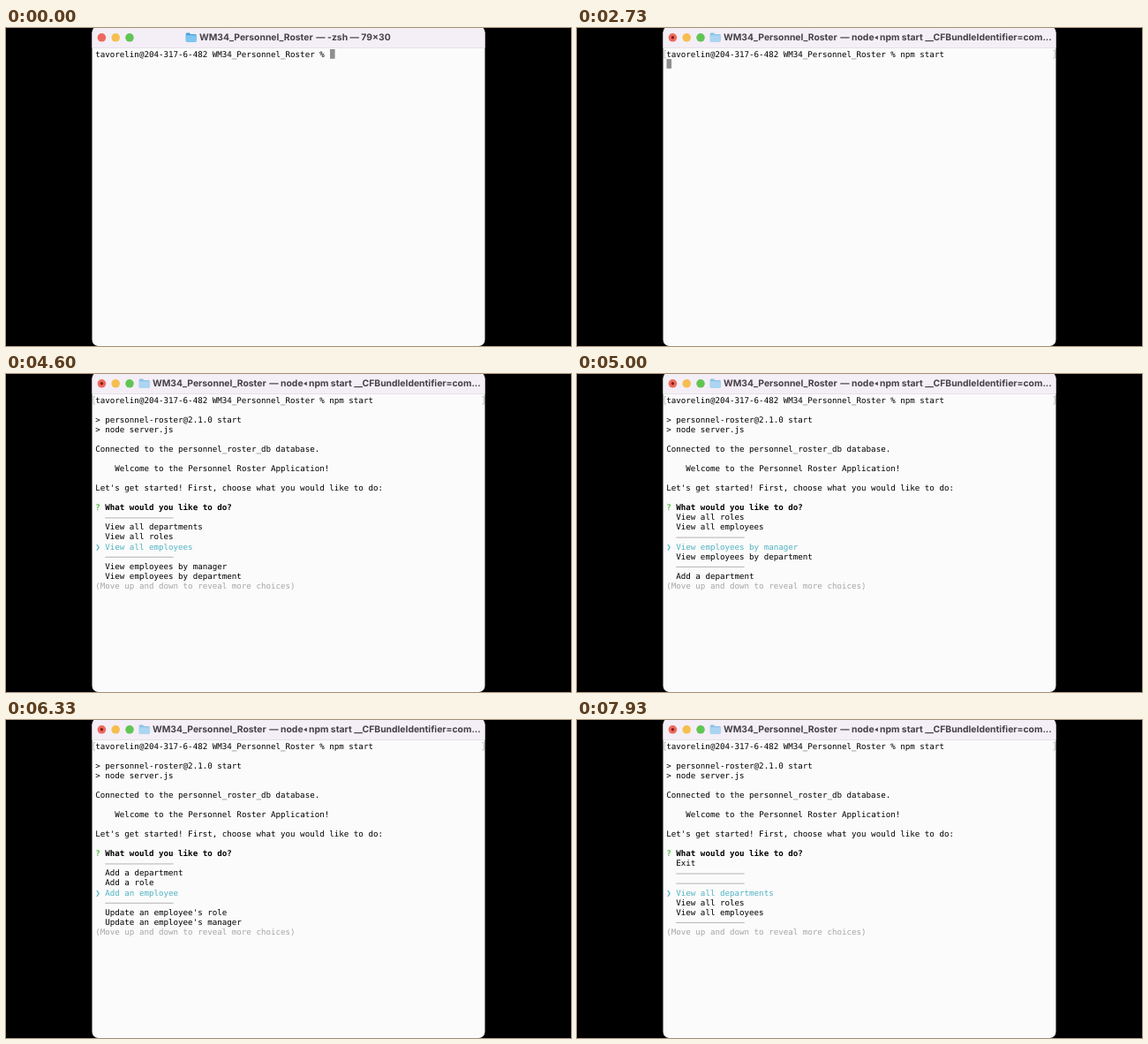
These frames come from a looping animation (640x360 px, 8000 ms). An HTML page:

```html
<!DOCTYPE html>
<html lang="en">
<head>
<meta charset="utf-8">
<title>Terminal session</title>
<style>
  html, body { margin: 0; width: 100%; height: 100%; overflow: hidden; background: #000; }
  svg { display: block; width: 640px; height: 360px; }
  text { white-space: pre; text-rendering: geometricPrecision; }
  .mono { font: 9.19px "DejaVu Sans Mono", "Noto Sans Mono", monospace; }
  .bold { font-weight: 700; }
  .title { font: 700 10.35px Inter, "Open Sans", sans-serif; fill: #454147; }
</style>
</head>
<body>
<svg id="stage" viewBox="0 0 640 360" xmlns="http://www.w3.org/2000/svg"></svg>
<script>
const LOOP = 8000;
const X0 = 101.2, COL = 5.532, BASE = 32.5, ROW = 11.07;
const INK = '#000', DIM = '#a6a6a6', CYAN = '#52b3c3', GREEN = '#5cb84c';

const PROJECT = 'WM34_Personnel_Roster';
const PROMPT = `tavorelin@204-317-6-482 ${PROJECT} % `;
const COMMAND = 'npm start';
const KEY_TIMES = [730, 930, 1060, 1260, 1460, 1660, 1800, 1930, 2060];
const ENTER = 2460, LAUNCH = 2800, MENU = 3200;
const FIRST_DOWN = 4200, DOWN_GAP = 333, LAST_DOWN = 11;

// An empty entry is a separator.
const CHOICES = [
  '', 'View all departments', 'View all roles', 'View all employees',
  '', 'View employees by manager', 'View employees by department',
  '', 'Add a department', 'Add a role', 'Add an employee',
  '', "Update an employee's role", "Update an employee's manager",
  '', 'Exit', ''
];
const PAGE = 7;
const choiceAt = i => CHOICES[i % CHOICES.length];
const selectable = [...Array(CHOICES.length * 2).keys()].filter(choiceAt);

const rect = (x, y, w, h, fill, rx = 0) =>
  `<rect x="${x}" y="${y}" width="${w}" height="${h}" rx="${rx}" fill="${fill}"/>`;
const light = (x, fill, r = 4.8) => `<circle cx="${x}" cy="10.8" r="${r}" fill="${fill}"/>`;
const mono = (row, col, str, fill = INK, bold = false) =>
  `<text class="mono${bold ? ' bold' : ''}" x="${X0 + col * COL}" y="${BASE + row * ROW}" fill="${fill}">${str.replace(/>/g, '&gt;')}</text>`;
const title = (x, str) => `<text class="title" x="${x}" y="14.2">${str}</text>`;
const cursor = (row, col) => rect(X0 + col * COL + 0.3, 24 + row * ROW, COL, 10.8, '#8f8f8f');
const rule = row => rect(X0 + 2 * COL, 29.7 + row * ROW, 14 * COL, 0.8, '#a2a2a2');

function folder(x, opacity) {
  return `<g transform="translate(${x} 4.8)" opacity="${opacity}">
    <path d="M0 2q0-1.2 1.2-1.2h3l1.3 1.4h5.3q1.2 0 1.2 1.2v6H0z" fill="#4fa3d6"/>
    ${rect(0, 3.5, 12, 7.6, '#7cc6ef', 1)}</g>`;
}

function frameWindow(running) {
  const bar = 'M97.5 22V5.5q0-7 7-7h431q7 0 7 7V22z';
  let out = rect(97.5, -1.5, 445, 361.5, '#fbfbfb', 7) +
    `<path d="${bar}" fill="#f4eef6"/>` + rect(97.5, 22, 445, 0.7, '#dedae0') +
    light(108.4, '#ed6a5e') + light(124.2, '#f5bf4f') + light(140, '#61c554');
  if (!running) {
    return out + folder(203.7, 1) + title(219, PROJECT) + title(351.3, '— -zsh — 79×30');
  }
  return out + light(108.4, '#861a12', 1.7) + folder(150.7, 0.6) +
    title(166, PROJECT) + title(298.3, '— node') +
    '<path d="M340.8 8.6v4.6l-3.6-2.3z" fill="#454147"/>' +
    title(343, 'npm start __CFBundleIdentifier=com...') +
    '<path d="M101 25.5h-2v8.5h2M539.3 25.5h2v8.5h-2" fill="none" stroke="#b0b0b0" stroke-width=".8"/>';
}

function menu(t) {
  const presses = Math.max(0, Math.min(LAST_DOWN, Math.floor((t - FIRST_DOWN) / DOWN_GAP) + 1));
  const active = selectable[presses];
  const top = Math.max(0, active - 3);
  let out = mono(11, 0, '?', GREEN, true) + mono(11, 2, 'What would you like to do?', INK, true);
  if (!presses) out += mono(11, 29, '(Use arrow keys)', DIM);
  for (let i = 0; i < PAGE; i++) {
    const row = 12 + i, label = choiceAt(top + i), on = top + i === active;
    out += label ? mono(row, 2, label, on ? CYAN : INK) : rule(row);
    if (on) out += mono(row, 0, '❯', CYAN);
  }
  return out + mono(19, 0, '(Move up and down to reveal more choices)', DIM);
}

function scene(t) {
  const typed = KEY_TIMES.filter(k => t >= k).length;
  let out = frameWindow(t >= ENTER) + mono(0, 0, PROMPT + COMMAND.slice(0, typed));
  if (t < ENTER) return out + cursor(0, PROMPT.length + typed);
  if (t < LAUNCH) return out + cursor(1, 0);
  out += mono(2, 0, '> personnel-roster@2.1.0 start') + mono(3, 0, '> node server.js');
  if (t < MENU) return out + cursor(5, 0);
  return out + mono(5, 0, 'Connected to the personnel_roster_db database.') +
    mono(7, 4, 'Welcome to the Personnel Roster Application!') +
    mono(9, 0, "Let's get started! First, choose what you would like to do:") + menu(t);
}

const stage = document.getElementById('stage');
const start = performance.now();
let shown = '';
function draw(now) {
  const next = scene(Math.max(0, now - start) % LOOP);
  if (next !== shown) stage.innerHTML = shown = next;
  requestAnimationFrame(draw);
}
draw(start);
</script>
</body>
</html>
```
